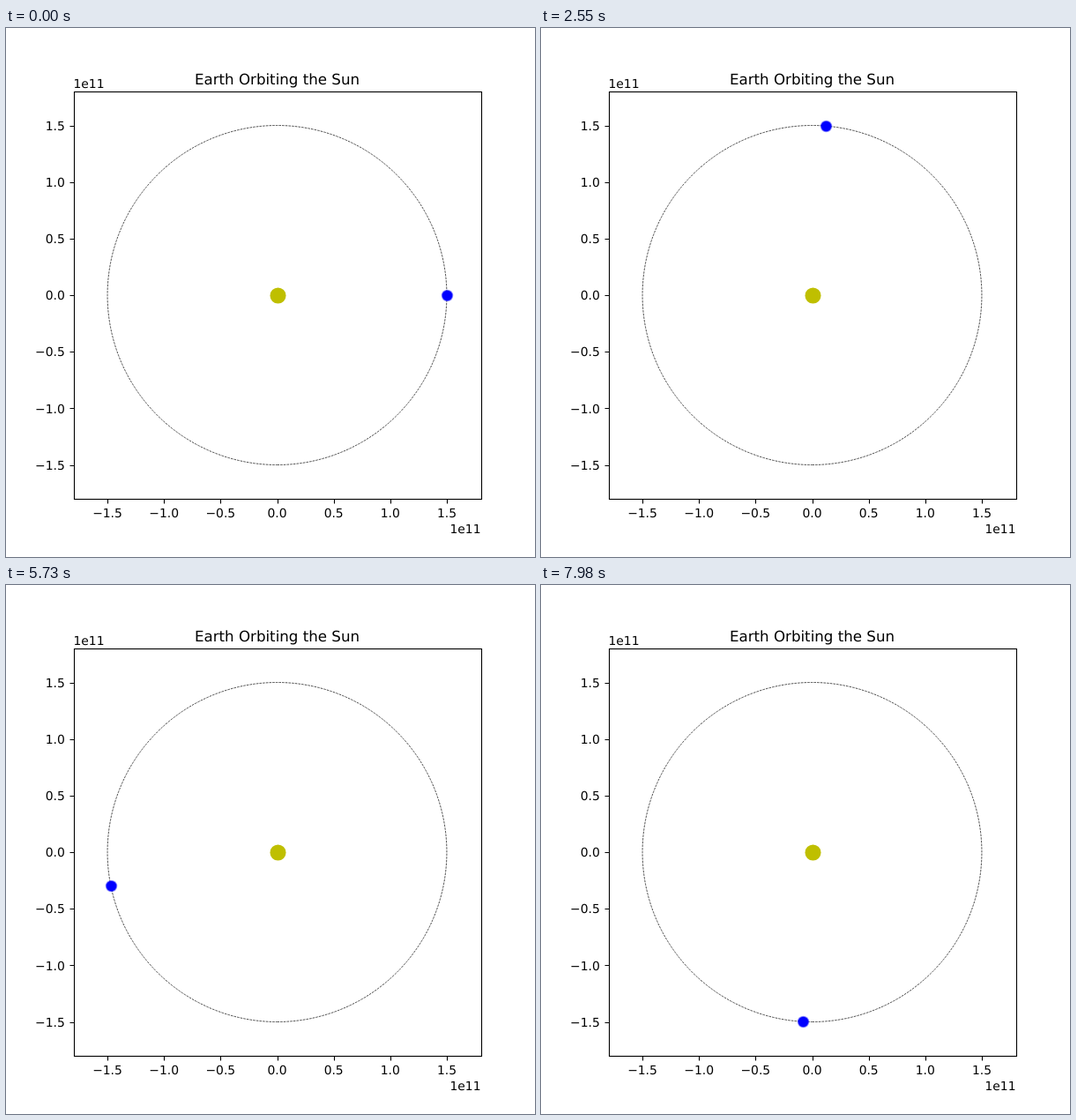
An HTML page for the animation above (8 s loop, 600 by 600 pixels).

```html
<!DOCTYPE html>
<html lang="en">
<head>
<meta charset="utf-8">
<title>Orbit plot</title>
<style>
  html, body { margin: 0; width: 100%; height: 100%; overflow: hidden; background: #fff; }
  svg { display: block; width: 600px; height: 600px; }
  text { font: 13.889px "DejaVu Sans", sans-serif; text-rendering: geometricPrecision; }
  .title { font-size: 16.667px; }
  .line { fill: none; stroke: #000; stroke-width: 1.111; }
  .orbit { fill: none; stroke: #000; stroke-width: .694; stroke-dasharray: 2.569 1.111; }
</style>
</head>
<body>
<svg id="plot" viewBox="0 0 600 600"></svg>
<script>
const LOOP = 8000, STEP = 30, STEPS_PER_ORBIT = 359;
const CX = 307.5, CY = 303, RADIUS = 192.5, UNIT = RADIUS / 1.5;
const plot = document.getElementById("plot");

function add(tag, attrs, content = "") {
  const node = document.createElementNS("http://www.w3.org/2000/svg", tag);
  for (const name in attrs) node.setAttribute(name, attrs[name]);
  node.textContent = content;
  return plot.appendChild(node);
}

function label(content, x, y, anchor, cls = "") {
  add("text", { x, y, "text-anchor": anchor, class: cls }, content);
}

// Centre of the pixel nearest to a coordinate
const snap = v => Math.floor(v + 0.5 + 1e-6) + 0.5;

// The orbit starts at the bottom and runs counterclockwise
add("path", {
  class: "orbit",
  d: `M${CX} ${CY + RADIUS}a${RADIUS} ${RADIUS} 0 0 0 0 ${-2 * RADIUS}a${RADIUS} ${RADIUS} 0 0 0 0 ${2 * RADIUS}`
});
add("circle", { cx: snap(CX), cy: snap(CY), r: 9.03, fill: "#bfbf00" });
const earth = add("circle", { r: 6.25, fill: "#00f" });

add("rect", { class: "line", x: 77.5, y: 72.5, width: 462, height: 462 });
for (let value = -1.5; value <= 1.5; value += 0.5) {
  const x = CX + value * UNIT, y = CY - value * UNIT;
  const name = value.toFixed(1).replace("-", "\u2212");
  add("path", { class: "line", d: `M${snap(x)} 534.5v5M77.5 ${snap(y)}h-5` });
  label(name, x, 555, "middle");
  label(name, 66.8, Math.round(y + 5.28), "end");
}
label("1e11", 538.5, 573, "end");
label("1e11", 76.5, 68, "start");
label("Earth Orbiting the Sun", CX, 64, "middle", "title");

function pose(step) {
  const angle = step * 2 * Math.PI / STEPS_PER_ORBIT;
  const x = snap(CX + RADIUS * Math.cos(angle));
  const y = snap(CY - RADIUS * Math.sin(angle));
  return `translate(${x}px, ${y}px)`;
}

const lastStep = Math.floor(LOOP / STEP);
const frames = Array.from({ length: lastStep + 1 }, (_, step) => ({
  transform: pose(step), offset: step * STEP / LOOP, easing: "step-end"
}));
frames.push({ transform: pose(lastStep), offset: 1 });
earth.animate(frames, { duration: LOOP, iterations: Infinity });
</script>
</body>
</html>
```
